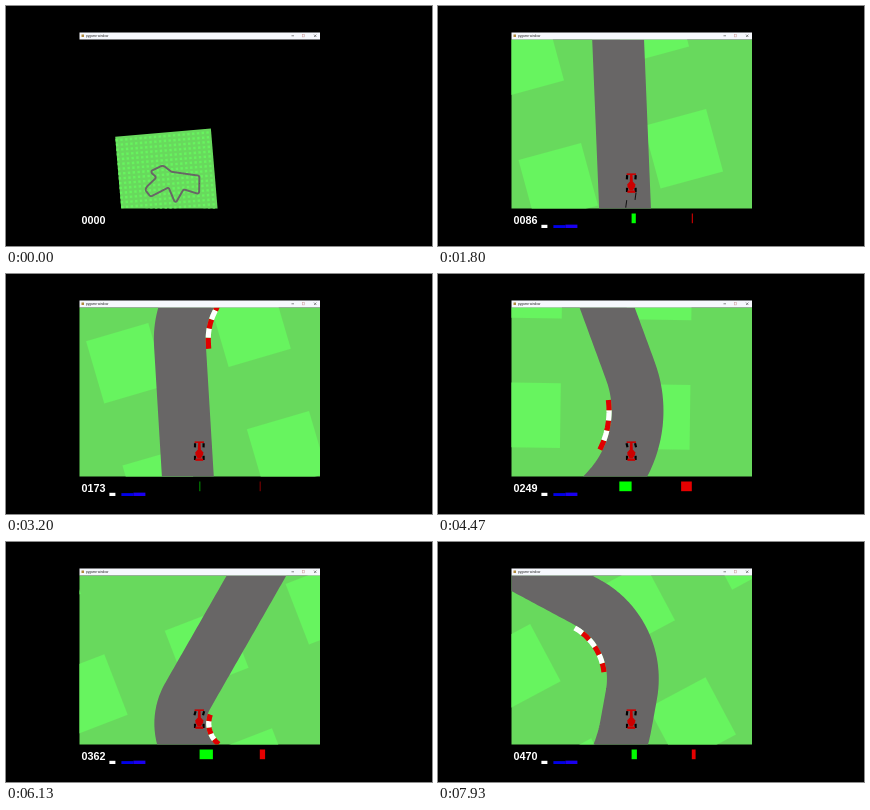
Animation of 426 by 240 pixels, one loop 8 s. Source, as an HTML page with a canvas:

```html
<!DOCTYPE html>
<html lang="en">
<head>
<meta charset="utf-8">
<title>Racing</title>
<style>
html, body { margin: 0; width: 100%; height: 100%; overflow: hidden; background: #000; }
canvas { display: block; }
</style>
</head>
<body>
<canvas id="stage" width="426" height="240"></canvas>
<script>
const ctx = document.getElementById('stage').getContext('2d');
const LOOP = 8000, STEP = 200 / 3;
const VIEW = { x: 73.5, y: 33.5, w: 240.5, h: 169 };
const CAR = { x: 193.3, y: 177.5 };
const FIELD = 1296, CELL = 64.8, ROAD = 51.8, TILE = 13.6, SUB = 4;

// Corners of the circuit in world pixels: x, y, radius, kerb tiles
const corners = [
  [832, 440, 50, 0], [881, -54, 50, 6], [136, -224, 90, 6], [-76, -419, 115, 5],
  [-405, -293, 40, 0], [-392, -228, 60, 0], [-275, -107, 55, 5], [-545, 112, 150, 0],
  [-614, 199, 87, 6], [-480, 400, 60, 0], [25, 190, 40, 0], [172, 640, 40, 0], [425, 275, 50, 0]
];

// Moments of the drive; between them the car follows the road
const moments = [
  { t: 0, x: 861, y: 153, angle: -4.8, score: 0, steer: 0, spin: 0 },
  { t: 800, x: 879, y: 91, angle: -16.8, score: 22, steer: -12.5, spin: -4.2 },
  { t: 1800, x: 699, y: -103, angle: 74.8, score: 86, steer: 4.2, spin: 1 },
  { t: 3200, x: 266.5, y: -207.5, angle: 73.7, score: 173, steer: .6, spin: .6 },
  { t: 4470, x: -64, y: -396, angle: 91.3, score: 249, steer: -12.3, spin: -10.7 },
  { t: 6130, x: -324, y: -95.5, angle: 159.5, score: 362, steer: 13.3, spin: 5.3 },
  { t: 7930, x: -562.6, y: 127.2, angle: 151.7, score: 470, steer: 5.3, spin: 3.8 }
];

const skids = [[879, 104, 876, 117], [715, -94, 722, -91], [710, -105, 717, -102]];

function unit(from, to) {
  const dx = to[0] - from[0], dy = to[1] - from[1], length = Math.hypot(dx, dy);
  return [dx / length, dy / length];
}

// Arc that rounds corner i; side is -1 for a left turn, 1 for a right turn
function roundCorner(p, i) {
  const n = corners.length, [x, y, radius, tiles] = p;
  const a = unit(p, corners[(i + n - 1) % n]), b = unit(p, corners[(i + 1) % n]);
  const half = Math.acos(a[0] * b[0] + a[1] * b[1]) / 2;
  const side = -Math.sign(a[0] * b[1] - a[1] * b[0]);
  const inward = unit([0, 0], [a[0] + b[0], a[1] + b[1]]);
  const cx = x + inward[0] * radius / Math.sin(half), cy = y + inward[1] * radius / Math.sin(half);
  const tangent = radius / Math.tan(half);
  const from = Math.atan2(y + a[1] * tangent - cy, x + a[0] * tangent - cx);
  const points = Array.from({ length: 25 }, (_, k) => {
    const angle = from + side * (Math.PI - 2 * half) * k / 24;
    return [cx + radius * Math.cos(angle), cy + radius * Math.sin(angle)];
  });
  return { points, side, tiles };
}

function resample(points, gap) {
  const out = [];
  let due = 0;
  points.forEach((p, i) => {
    const q = points[(i + 1) % points.length], dir = unit(p, q);
    const length = Math.hypot(q[0] - p[0], q[1] - p[1]);
    for (; due < length; due += gap) out.push([p[0] + dir[0] * due, p[1] + dir[1] * due]);
    due -= length;
  });
  return out;
}

const bends = corners.map(roundCorner);
const line = resample(bends.flatMap(bend => bend.points), TILE / SUB);

function pointAt(place) {
  const n = line.length, i = Math.floor(place), u = place - i;
  const a = line[(i + n) % n], b = line[(i + 1 + n) % n];
  return [a[0] + (b[0] - a[0]) * u, a[1] + (b[1] - a[1]) * u];
}

function beside(place, offset) {
  const p = pointAt(place), [dx, dy] = unit(pointAt(place - 1), pointAt(place + 1));
  return [p[0] - dy * offset, p[1] + dx * offset];
}

function nearest(x, y) {
  const distance = p => Math.hypot(p[0] - x, p[1] - y);
  return line.reduce((best, p, i) => distance(p) < distance(line[best]) ? i : best, 0);
}

function heading(place) {
  const [dx, dy] = unit(pointAt(place - 16), pointAt(place + 16));
  return Math.atan2(-dx, -dy) * 180 / Math.PI;
}

function trace(points, close) {
  const path = new Path2D();
  points.forEach(p => path.lineTo(p[0], p[1]));
  if (close) path.closePath();
  return path;
}

const roadPath = trace(line, true);
const kerbTiles = bends.flatMap(({ points, side, tiles }) => {
  const first = nearest(...points[12]) - 9;
  return Array.from({ length: tiles }, (_, k) => ({
    color: k % 2 ? '#fff' : '#e00000',
    path: trace(Array.from({ length: SUB + 1 }, (_, j) => beside(first + k * SUB + j, side * (ROAD / 2 + 2.6))))
  }));
});

// Describe each moment by place on the road, distance from its middle and drift
for (const m of moments) {
  m.place = nearest(m.x, m.y);
  const p = pointAt(m.place), [dx, dy] = unit(pointAt(m.place - 1), pointAt(m.place + 1));
  m.offset = (m.y - p[1]) * dx - (m.x - p[0]) * dy;
  m.drift = (m.angle - heading(m.place) + 540) % 360 - 180;
}

function segment(t) {
  let i = 0;
  while (i < moments.length - 2 && t >= moments[i + 1].t) i++;
  return i;
}

function linear(name, t) {
  const i = segment(t), a = moments[i], b = moments[i + 1];
  return a[name] + (b[name] - a[name]) * (t - a.t) / (b.t - a.t);
}

function smooth(name, t) {
  const span = i => moments[i + 1].t - moments[i].t;
  const slope = i => (moments[i + 1][name] - moments[i][name]) / span(i);
  const tangent = i => {
    if (i === 0) return 0;
    if (i === moments.length - 1) return slope(i - 1);
    return (slope(i - 1) * span(i) + slope(i) * span(i - 1)) / (span(i - 1) + span(i));
  };
  const i = segment(t), h = span(i), u = (t - moments[i].t) / h, v = 1 - u;
  return v * v * (1 + 2 * u) * moments[i][name] + u * u * (3 - 2 * u) * moments[i + 1][name] +
    h * u * v * (v * tangent(i) - u * tangent(i + 1));
}

function rect(color, x, y, w, h) {
  ctx.fillStyle = color;
  ctx.fillRect(x, y, w, h);
}

function stroke(path, color, width) {
  ctx.strokeStyle = color;
  ctx.lineWidth = width;
  ctx.stroke(path);
}

function drawWorld(t, zoom) {
  const place = smooth('place', t), [x, y] = beside(place, smooth('offset', t));
  ctx.save();
  ctx.beginPath();
  ctx.rect(VIEW.x, VIEW.y, VIEW.w, VIEW.h);
  ctx.clip();
  ctx.translate(CAR.x, CAR.y);
  ctx.rotate((heading(place) + smooth('drift', t)) * Math.PI / 180);
  ctx.scale(zoom, zoom);
  ctx.translate(-x, -y);
  rect('#68d95d', -FIELD, -FIELD, 2 * FIELD, 2 * FIELD);
  for (let i = -20; i < 20; i += 2)
    for (let j = -20; j < 20; j += 2)
      rect('#67f45f', i * CELL, (j + 1) * CELL, CELL, CELL);
  ctx.lineJoin = 'round';
  stroke(roadPath, '#686666', ROAD);
  kerbTiles.forEach(tile => stroke(tile.path, tile.color, 5.2));
  skids.forEach(([a, b, c, d]) => stroke(trace([[a, b], [c, d]]), '#111', 1));
  ctx.restore();
}

function drawCar(zoom, steer) {
  const shape = points => ctx.fill(trace(points, true));
  ctx.save();
  ctx.translate(CAR.x, CAR.y);
  ctx.scale(.0778 * zoom, .0778 * zoom);
  for (const side of [-55, 55])
    for (const end of [-80, 82]) {
      ctx.save();
      ctx.translate(side, end);
      if (end < 0) ctx.rotate(steer * .02);
      rect('#000', -14, -27, 28, 54);
      ctx.restore();
    }
  rect('#cc0000', -60, -130, 120, 20);
  shape([[-15, -120], [15, -120], [20, -20], [-20, -20]]);
  shape([[25, -20], [50, 10], [50, 40], [20, 90], [-20, 90], [-50, 40], [-50, 10], [-25, -20]]);
  rect('#cc0000', -50, 90, 100, 30);
  ctx.restore();
}

function drawTitleBar() {
  rect('#f6f8fd', 73.5, 26.5, 240.5, 7);
  rect('#b08a3c', 75.5, 28.5, 2.5, 2.5);
  ctx.fillStyle = '#222';
  ctx.font = '3.1px "Liberation Sans", sans-serif';
  ctx.textAlign = 'left';
  ctx.fillText('pygame window', 80, 31);
  rect('#555', 285.5, 29.5, 2.5, .7);
  ctx.lineWidth = .5;
  ctx.strokeStyle = '#c99';
  ctx.strokeRect(296.5, 28.7, 2.2, 2.2);
  stroke(new Path2D('M308 28.6l2.4 2.4m0-2.4l-2.4 2.4'), '#444', .6);
}

function drawPanel(t, steer) {
  ctx.fillStyle = '#fff';
  ctx.font = 'bold 10.8px "Liberation Sans", Arial, sans-serif';
  ctx.textAlign = 'center';
  ctx.fillText(String(Math.round(linear('score', t))).padStart(4, '0'), 87.5, 217.7);
  const speed = Math.min(1, t / 800) * 3.2;
  rect('#fff', 103.4, 222 - speed, 6, speed);
  rect('#0000e6', 115.4, 222 - speed * .9, 12, speed * .9);
  rect('#1a00f0', 127.4, 222 - speed * 1.05, 12, speed * 1.05);
  rect('#00ff00', 193.6, 207.5, steer, 9.7);
  rect('#e60000', 253.8, 207.5, linear('spin', t), 9.7);
}

function draw(now) {
  const t = Math.floor(now % LOOP / STEP + .06) * STEP;
  const grown = Math.min(1, t / 750), zoom = (1 - grown) / 27 + grown;
  const steer = linear('steer', t);
  rect('#000', 0, 0, 426, 240);
  drawWorld(t, zoom);
  drawCar(zoom, steer);
  drawTitleBar();
  drawPanel(t, steer);
}

const start = performance.now();
function tick() {
  draw(performance.now() - start);
  requestAnimationFrame(tick);
}
tick();
</script>
</body>
</html>
```
